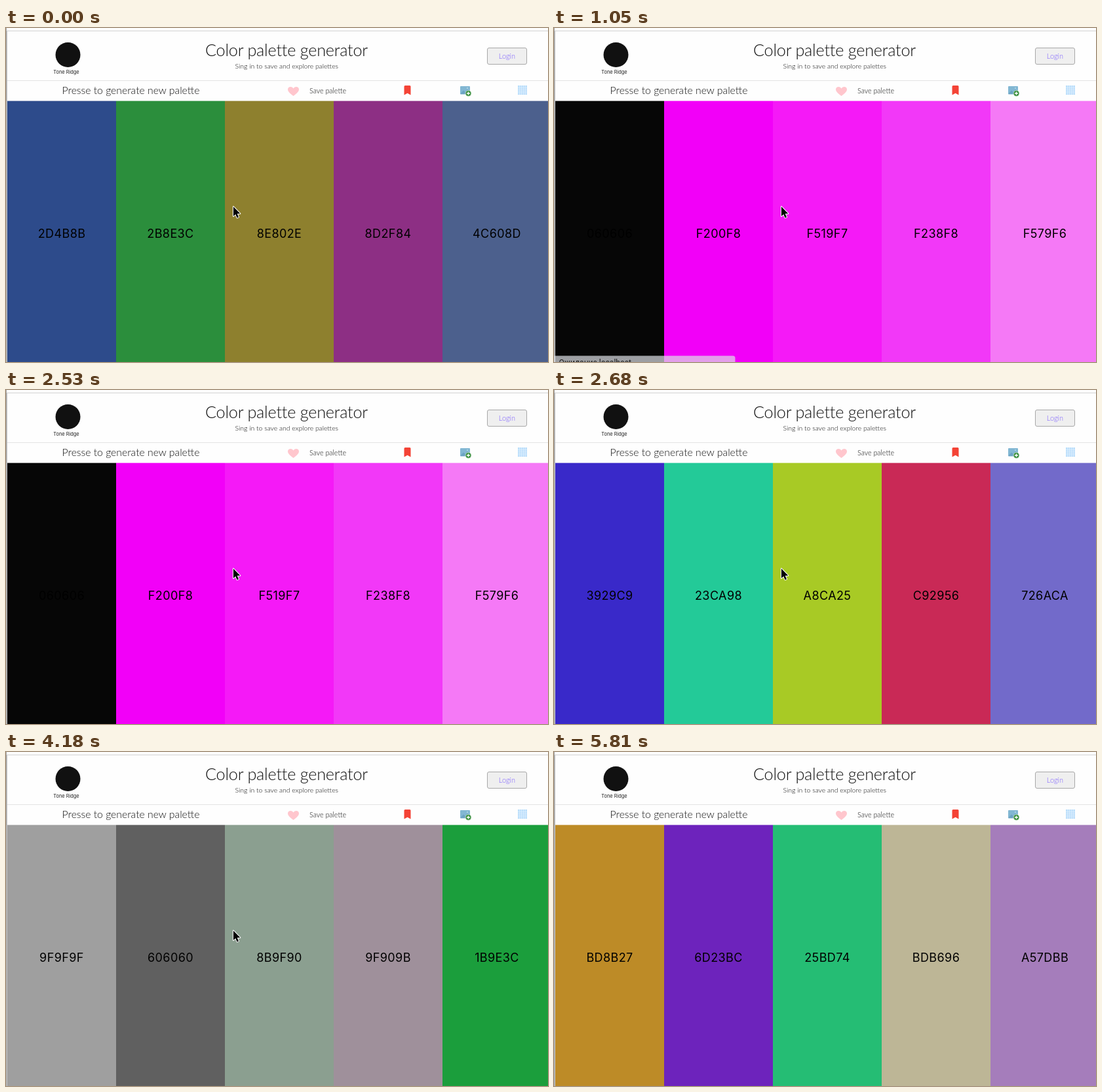
These frames come from a looping animation (827x511 px, 6.7 s). An HTML page:

```html
<!DOCTYPE html>
<html lang="en">
<head>
<meta charset="utf-8">
<title>Color palette generator</title>
<style>
  html, body { margin: 0; width: 100%; height: 100%; overflow: hidden; background: #fefefe; }
  svg { display: block; width: 100vw; height: 100vh; }
  .ui { font-family: Lato, sans-serif; font-weight: 300; }
  .hex { font: 400 18px Inter, sans-serif; letter-spacing: .4px; }
  .mid { text-anchor: middle; }
</style>
</head>
<body>
<svg viewBox="0 0 827 511" xmlns="http://www.w3.org/2000/svg">
  <rect width="827" height="511" fill="#fefefe"/>
  <rect y="4" width="827" height="1" fill="#d2d2d2"/>
  <rect x="2" y="80" width="825" height="1" fill="#e4e4e4"/>

  <circle cx="94.5" cy="41" r="19" fill="#111"/>
  <text class="mid" x="92" y="69.5" font-family="Inter, sans-serif" font-size="7.4" fill="#222">Tone Ridge</text>

  <g class="ui" fill="#111">
    <text class="mid" x="428" y="43" font-size="25.2" letter-spacing="-.2">Color palette generator</text>
    <text class="mid" x="428.3" y="62" font-size="10.4">Sing in to save and explore palettes</text>
    <rect id="press" x="41" y="79" width="303" height="32" rx="3" fill="#ececec"/>
    <text class="mid" x="190.5" y="101" font-size="15.75">Presse to generate new palette</text>
    <text x="463" y="100" font-size="10.7">Save palette</text>
    <rect x="734.5" y="30.5" width="60" height="25" rx="2.5" fill="#efefef" stroke="#a8a8a8"/>
    <text class="mid" x="764.5" y="46.5" font-size="11" fill="#7a5cff">Login</text>
  </g>

  <path d="M438.5 104C434 100.5 430 97.5 430 94C430 89.5 436 88.5 438.5 92.5C441 88.5 447 89.5 447 94C447 97.5 443 100.5 438.5 104Z" fill="#ffc6cd"/>
  <path d="M607.5 89.5Q607.5 88 609 88H616Q617.5 88 617.5 89.5V102.5L612.5 99.8L607.5 102.5Z" fill="#f44336"/>

  <rect x="693" y="89" width="15" height="12.5" rx="1" fill="#82b7d3"/>
  <path d="M693.5 100.5L698 95.5L700.5 98L704 94L707.5 98V101H693.5Z" fill="#6ba3c3"/>
  <circle cx="704" cy="92" r="1" fill="#b9dcea"/>
  <circle cx="705.5" cy="100" r="4.5" fill="#388e3c" stroke="#fff" stroke-width=".6"/>
  <path d="M703 100H708M705.5 97.5V102.5" stroke="#fff" stroke-width="1.3"/>

  <rect x="781" y="88" width="14" height="14" fill="#b5dbfa"/>
  <path id="mesh" stroke="#e9f5ff" stroke-width=".7"/>

  <g id="columns"></g>
  <rect width="1" height="511" fill="#a2a2a2"/>
  <rect x="1" y="5" width="1" height="506" fill="#c4c4c4"/>

  <g id="status">
    <path d="M0 511V501.5H273Q276.5 501.5 276.5 505V511Z" fill="#dee1e6"/>
    <text x="7.5" y="516" font-family="Roboto, sans-serif" font-size="12" fill="#222">Ожидание localhost…</text>
  </g>

  <path id="cursor" transform="translate(346.9 273.2)" d="M0 0V14.8L3.3 11.7L5.7 17.2L8.1 16.2L5.8 10.7H10.4Z"
        stroke="#fff" stroke-width="2" stroke-linejoin="round" paint-order="stroke"/>
</svg>
<script>
  const LOOP = 6700;
  const CURSOR_GONE = 5660;
  const palettes = [
    [0, '2D4B8B 2B8E3C 8E802E 8D2F84 4C608D'],
    [1050, '060606 F200F8 F519F7 F238F8 F579F6'],
    [2680, '3929C9 23CA98 A8CA25 C92956 726ACA'],
    [4180, '9F9F9F 606060 8B9F90 9F909B 1B9E3C'],
    [5660, 'BD8B27 6D23BC 25BD74 BDB696 A57DBB']
  ].map(([start, list]) => [start, list.split(' ')]);

  // Button held down: [from, to]
  const presses = [[1940, 2090], [3430, 3580], [4770, 5070]];
  // Status bubble: [shown, fading, hidden]
  const waits = [[750, 1050, 1200], [2090, 2390, 2530], [3580, 3880, 4030], [5070, 5370, 5510]];

  const $ = id => document.getElementById(id);
  const within = (t, from, to) => t >= from && t < to;
  const fade = (id, opacity) => $(id).setAttribute('opacity', opacity);

  function add(tag, attrs) {
    const el = document.createElementNS('http://www.w3.org/2000/svg', tag);
    for (const key in attrs) el.setAttribute(key, attrs[key]);
    return $('columns').appendChild(el);
  }

  const columns = [0, 1, 2, 3, 4].map(i => {
    const x = 2 + i * 166;
    return {
      box: add('rect', { x, y: 111.6, width: 166, height: 400 }),
      label: add('text', { class: 'hex mid', x: x + 83, y: 320.5 })
    };
  });

  $('mesh').setAttribute('d', [1, 2, 3, 4].map(i => {
    const step = i * 2.8;
    return `M${781 + step} 88v14M781 ${88 + step}h14`;
  }).join(''));

  let shown;
  function draw(t) {
    const colors = palettes.filter(([start]) => t >= start).pop()[1];
    if (colors !== shown) {
      columns.forEach(({ box, label }, i) => {
        box.setAttribute('fill', '#' + colors[i]);
        label.textContent = colors[i];
      });
      shown = colors;
    }
    fade('press', presses.some(([from, to]) => within(t, from, to)) ? 1 : 0);
    fade('cursor', t < CURSOR_GONE ? 1 : 0);

    const wait = waits.find(([from, , to]) => within(t, from, to));
    fade('status', !wait ? 0 : t < wait[1] ? 1 : 0.7);
  }

  const origin = performance.now();
  function tick() {
    draw((performance.now() - origin) % LOOP);
    requestAnimationFrame(tick);
  }
  tick();
</script>
</body>
</html>
```
